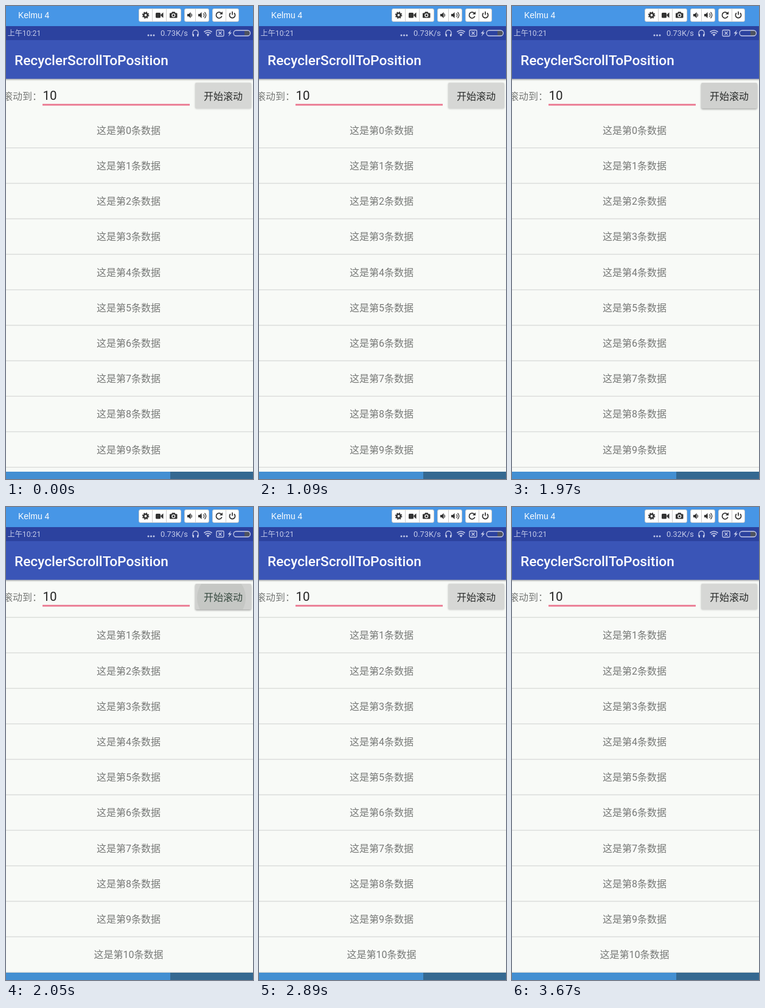
Write an HTML page that moves like this. It is 406x776 px and loops after 3.74 s.

```html
<!DOCTYPE html>
<html lang="zh-CN">
<head>
<meta charset="utf-8">
<title>RecyclerScrollToPosition</title>
<style>
  html, body { margin: 0; width: 100%; height: 100%; overflow: hidden; background: #f8faf7; }
  svg { display: block; font-family: Roboto, "Noto Sans CJK SC", "Noto Sans CJK", sans-serif; }
</style>
</head>
<body>
<svg width="406" height="776" viewBox="0 0 406 776">
  <defs>
    <linearGradient id="shade" x2="0" y2="1">
      <stop stop-color="#000" stop-opacity=".32"/>
      <stop offset="1" stop-color="#000" stop-opacity="0"/>
    </linearGradient>
    <filter id="blur" x="-20%" y="-20%" width="140%" height="150%"><feGaussianBlur stdDeviation="1.5"/></filter>
    <clipPath id="listArea"><rect y="174" width="406" height="590"/></clipPath>
    <clipPath id="buttonArea"><rect x="311" y="126" width="92" height="42" rx="2"/></clipPath>
  </defs>
  <rect width="406" height="776" fill="#f8faf7"/>

  <g clip-path="url(#listArea)">
    <g id="list" font-size="16" fill="#777977" text-anchor="middle"></g>
  </g>

  <!-- input row -->
  <text x="-5" y="153.7" font-size="16" fill="#777977">滚动到：</text>
  <text x="60.5" y="153.6" font-size="20.5" fill="#222">10</text>
  <rect x="60" y="160.6" width="242" height="2.8" fill="#ea768e"/>
  <rect id="cursor" x="83.3" y="131" width="2.2" height="28.5" fill="#e8557a"/>
  <rect id="shadow" x="311" y="126.5" width="92" height="42" rx="2" filter="url(#blur)"/>
  <rect id="button" x="311" y="126" width="92" height="42" rx="2"/>
  <circle id="ripple" cx="354" cy="149" fill="#364a40" clip-path="url(#buttonArea)"/>
  <text id="label" x="357" y="153.7" font-size="16" font-weight="500" text-anchor="middle">开始滚动</text>

  <!-- app and status bars -->
  <rect y="119" width="406" height="4" fill="url(#shade)"/>
  <rect y="55" width="406" height="64.5" fill="#3a55b7"/>
  <text x="14" y="96.5" font-size="22.7" font-weight="500" fill="#fff">RecyclerScrollToPosition</text>
  <rect y="32" width="406" height="24" fill="#2c429f"/>
  <g fill="#c3cae9">
    <text x="2.5" y="49" font-size="12.2">上午10:21</text>
    <text id="speed" x="254" y="49" font-size="12.8"></text>
    <circle cx="234" cy="48" r="1.5"/><circle cx="238.5" cy="48" r="1.5"/><circle cx="243" cy="48" r="1.5"/>
    <path d="M306 46h3v4h-2zM314 46h3l-1 4h-2zM329.5 46.8q2.5-2 5 0l-2.5 3zM370 39l-5.5 6h3l-2 5 5.5-6.5h-3z"/>
  </g>
  <g fill="none" stroke="#c3cae9" stroke-width="1.3">
    <path d="M307 47v-3a4.5 4.5 0 0 1 9 0v3"/>
    <path d="M325.5 42.5q6.5-5 13 0M327.5 45q4.5-3.4 9 0" stroke-width="1.6"/>
    <rect x="346" y="39.5" width="12" height="10" rx="1.5"/>
    <path d="M349.5 42l5 5m0-5l-5 5"/>
    <path d="M392 40h5a4.5 4.5 0 0 1 0 9h-5z" fill="#4d5260" stroke="none"/>
    <rect x="374" y="40" width="27.5" height="9" rx="4.5"/>
  </g>

  <!-- window header -->
  <rect width="406" height="33" fill="#4796e6"/>
  <text x="20" y="20" font-size="14" font-family="'Liberation Sans', Arial, sans-serif" fill="#fff">Kelmu 4</text>
  <g fill="#fff" stroke="#ccc">
    <rect x="218.5" y="4.5" width="69" height="21" rx="2.5"/>
    <rect x="293.5" y="4.5" width="40" height="21" rx="2.5"/>
    <rect x="339.5" y="4.5" width="43" height="21" rx="2.5"/>
    <path d="M240.5 5v20M263.5 5v20M311.5 5v20M361.5 5v20"/>
  </g>
  <g fill="none" stroke="#333">
    <circle cx="229.5" cy="15" r="3.2" stroke-width="2.6"/>
    <circle cx="229.5" cy="15" r="5" stroke-width="1.6" stroke-dasharray="2 1.927"/>
    <path d="M320 12.5q2 2.5 0 5M324.5 12q2.5 3 0 6M326.5 10q4.5 5 0 10M304.5 12.5q2 2.5 0 5" stroke-width="1.2"/>
    <path d="M354 12a4.8 4.8 0 1 0 .8 4.5M369 11.5a4.6 4.6 0 1 0 6 0M372 9v5.5" stroke-width="1.7"/>
  </g>
  <g fill="#333">
    <rect x="246" y="11" width="8" height="8.5" rx="1.5"/>
    <path d="M254.5 14l4-3.5v9l-4-3.5zM351 13.8h5V9zM298 13h2.5l3-3v10l-3-3H298zM316 13h2.5l3-3v10l-3-3H316z"/>
    <path d="M270 11.5h2l1-2h4.5l1 2h2q1 0 1 1v6q0 1-1 1H270q-1 0-1-1v-6q0-1 1-1z"/>
  </g>
  <circle cx="275.3" cy="15.3" r="2.4" fill="#333" stroke="#fff" stroke-width="1.3"/>

  <rect y="764" width="406" height="12" fill="#438fd2"/>
  <rect x="270" y="764" width="136" height="12" fill="#356891"/>
</svg>
<script>
const LOOP = 3740, ROW = 58.22, JUMP = 2050, PRESS = 1890;
const $ = id => document.getElementById(id);
const set = (id, attrs) => { for (const k in attrs) $(id).setAttribute(k, attrs[k]); };
const ramp = (t, from, to) => Math.min(1, Math.max(0, (t - from) / (to - from)));
const blinks = [[160, 630], [1180, 1650], [2120, 2660], [3120, 3670]];

$('list').innerHTML = Array.from({ length: 11 }, (_, i) => {
  const y = i * ROW;
  return `<text x="201.5" y="${209.7 + y}">这是第${i}条数据</text>
    <rect y="${232 + y}" width="406" height="1.4" fill="#dadcda"/>`;
}).join('');

function draw(t) {
  const press = ramp(t, PRESS, 1970) * (1 - ramp(t, JUMP, 2430));
  const spread = ramp(t, JUMP, 2430);
  set('list', { transform: `translate(0 ${t < JUMP ? 0 : -51.6})` });
  set('cursor', { visibility: blinks.some(([on, off]) => t >= on && t < off) ? 'visible' : 'hidden' });
  set('shadow', { opacity: 0.22 + 0.13 * press, transform: `translate(0 ${press})` });
  set('button', { fill: `rgb(${[214, 215, 213].map(c => c - 6 * press)})` });
  set('ripple', { r: 40 + 20 * spread, opacity: t < JUMP ? 0 : 0.07 * (1 - spread) });
  set('label', { fill: t >= JUMP && t < 2120 ? '#36493f' : '#292b2a' });
  $('speed').textContent = t < 3440 ? '0.73K/s' : '0.32K/s';
}

const start = performance.now();
function tick() {
  draw((performance.now() - start) % LOOP);
  requestAnimationFrame(tick);
}
tick();
</script>
</body>
</html>
```
